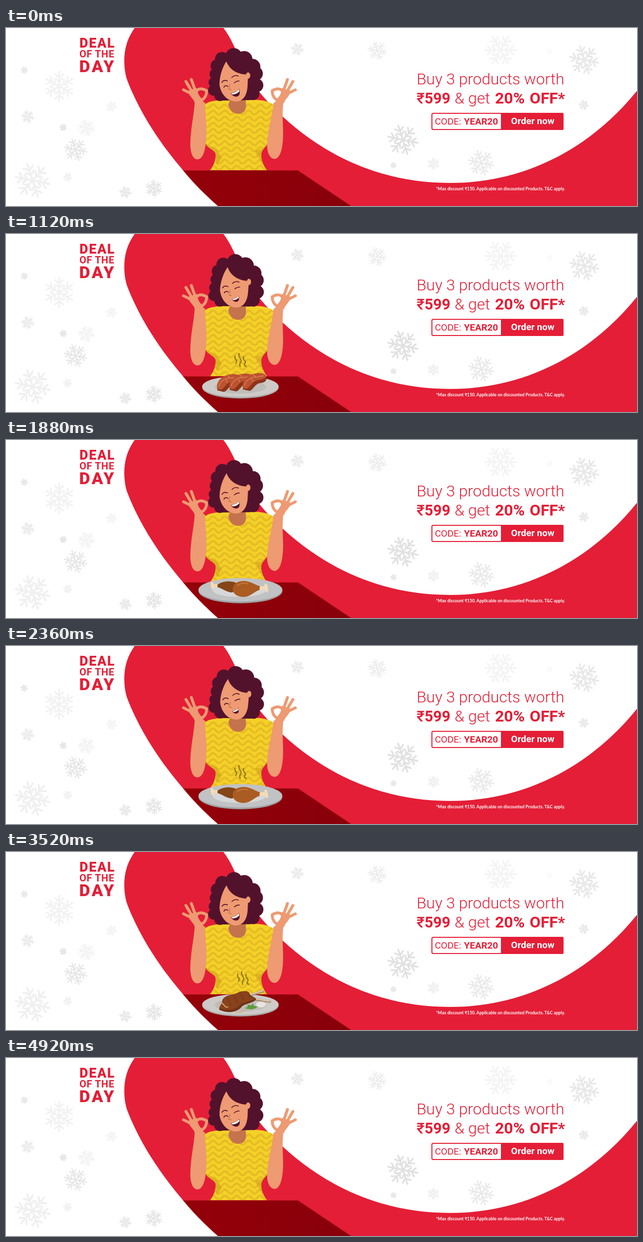
Write an HTML page that moves like this. It is 1280 px wide and 363 px high and loops after 5000 ms.

```html
<!DOCTYPE html>
<html lang="en">
<head>
<meta charset="utf-8">
<title>Deal of the day</title>
<style>
html, body { margin: 0; width: 100%; height: 100%; overflow: hidden; background: #fff; }
svg { display: block; width: 100%; height: 100%; }
text { font-family: Roboto, "Open Sans", sans-serif; fill: #e41e36; white-space: pre; }
.light { font-weight: 350; }
.bold { font-weight: 700; }
.black { font-weight: 900; }
.skin { fill: #ee9a72; }
.finger { fill: none; stroke: #ee9a72; stroke-width: 5.8; stroke-linecap: round; stroke-linejoin: round; }
.hair { fill: #53122c; }
.line { fill: none; stroke: #53122c; stroke-width: 1.7; stroke-linecap: round; }
</style>
</head>
<body>
<svg viewBox="0 0 1280 363" xmlns="http://www.w3.org/2000/svg">
  <defs>
    <path id="swoosh" d="M261 0C245 22 240 45 240 67C240 85 243 100 248 112C273 175 313 236 359 290C381 317 405 341 430 363H1280V128C1190 240 1060 316 900 316C760 316 640 260 545 165C520 140 493 108 475 64C463 38 455 18 441 0Z"/>
    <path id="shirt" d="M402 157C410 149 426 147 450 147H492C514 145 534 149 543 157L546 170L534 205L532 234C527 243 519 248 518 256C517 270 522 280 530 291H413C421 282 426 270 425 256C422 248 410 246 405 236C408 205 404 178 402 157Z"/>
    <clipPath id="inSwoosh"><use href="#swoosh"/></clipPath>
    <clipPath id="inShirt"><use href="#shirt"/></clipPath>
    <linearGradient id="wood" x1="0" x2="1">
      <stop offset="0" stop-color="#940009"/><stop offset="1" stop-color="#88000a"/>
    </linearGradient>
    <g id="hand">
      <path class="skin" d="M383 153C381 144 370 139 370 128L387 122C388 131 391 139 399 146L403 157Z"/>
      <path class="finger" d="M376 134L360 126M378 131L365 109M384 128L376 105"/>
      <path class="finger" d="M386 130C390 121 401 124 407 128C407 137 403 145 394 148"/>
    </g>
    <g id="steak">
      <path fill="#8c3418" d="M429 319C426 300 440 288 456 287C470 285 479 291 476 299C472 308 464 304 458 308C451 312 449 320 442 322Z"/>
      <path fill="#bd5330" d="M428 312C428 298 440 288 456 286C468 284 478 289 475 294C470 300 461 298 454 302C446 306 443 314 437 317C432 318 428 316 428 312Z"/>
      <path fill="none" stroke="#dc8a62" stroke-width="1.3" stroke-linecap="round" d="M432 311C434 300 446 293 455 294L471 291M455 294L450 289M446 297L449 303"/>
    </g>
    <g id="dish">
      <ellipse cx="475.500" cy="316" rx="70" ry="21" fill="#5d0007" opacity=".45"/>
      <ellipse cx="475.500" cy="313" rx="77.500" ry="22.500" fill="#aaa7a4"/>
      <ellipse cx="475.500" cy="311" rx="77.500" ry="21.500" fill="#cdcac7"/>
      <ellipse cx="475.500" cy="312" rx="52" ry="13.500" fill="#bfbcb9"/>
    </g>
  </defs>

  <g id="flakes" fill="none" stroke-linecap="round"></g>
  <use href="#swoosh" fill="#e41e36"/>

  <g>
    <use href="#shirt" fill="#f4d127"/>
    <g clip-path="url(#inShirt)">
      <path id="waves" fill="none" stroke="#e6bd25" stroke-width="4.500"/>
      <path fill="#c99f18" opacity=".55" d="M405 236L427 248L438 264L428 280L424 262ZM532 236L518 248L504 250L514 266L520 280Z"/>
    </g>
    <path fill="#c4734d" d="M456 145H486L487 160C486 170 480 175 471 175C460 175 452 167 451 155Z"/>
  </g>

  <g id="head">
    <g id="curls" class="hair">
      <path d="M422 92L436 62L465 50L490 60L508 85L512 125L496 147L438 148L415 128Z"/>
    </g>
    <path class="skin" d="M447 68C439 80 433 98 433 116C436 136 450 150 467 150C481 149 489 138 490 118L491 95C472 95 454 87 447 68Z"/>
    <ellipse class="skin" cx="491" cy="97" rx="4.500" ry="6.500"/>
    <path class="line" stroke-width="2.200" d="M438 111C440 107 444 106 449 108M458 101C461 97 467 96 471 98"/>
    <path class="line" d="M442 121C443 117 447 117 450 119M463 112C465 110 468 108 473 108"/>
    <path fill="none" stroke="#c4734d" stroke-width="1.500" stroke-linecap="round" d="M454 115L452 125L457 126"/>
    <g id="mouth">
      <path class="hair" d="M456 133Q467 132 473 124Q477 139 467 140Q460 140 456 133Z"/>
      <path fill="#fff" d="M457 133Q467 132 472.500 125L473.500 129Q467 136 459 135.500Z"/>
    </g>
  </g>

  <path class="skin" d="M383 148L404 152C403 175 409 200 406 225C405 250 399 268 388 268C377 267 373 250 374 232C375 200 382 175 383 148Z"/>
  <path class="skin" d="M543 152L563 148C559 180 563 200 562 222C561 250 555 266 545 267C533 266 528 250 530 230C532 205 540 180 543 152Z"/>
  <use href="#hand"/>
  <use href="#hand" transform="matrix(-1 0 0 1 947 0)"/>

  <g clip-path="url(#inSwoosh)">
    <path fill="url(#wood)" d="M350 290H592L700 363H425Z"/>
    <path fill="none" stroke="#b8101f" d="M355 290.500H592L700 363"/>

    <g class="plate">
      <use href="#dish"/>
      <use href="#steak"/>
      <use href="#steak" x="25" y="-1"/>
      <use href="#steak" x="52" y="-2"/>
    </g>

    <g class="plate">
      <ellipse cx="475" cy="312" rx="76" ry="22" fill="#5d0007" opacity=".45"/>
      <ellipse cx="475.500" cy="308" rx="85" ry="25" fill="#9fa1a3"/>
      <ellipse cx="475.500" cy="305.500" rx="85" ry="24" fill="#c0c2c4"/>
      <ellipse cx="473" cy="306" rx="54" ry="14" fill="#d6d7d8"/>
      <path fill="none" stroke="#f3dcb6" stroke-width="6" stroke-linecap="round" d="M420 297H438M418 293L419 301M506 302L526 301M527 296L529 307"/>
      <path fill="#854517" d="M429 295C438 288 454 286 466 291C474 297 470 308 458 311C446 310 438 302 429 300Z"/>
      <path fill="#ab5c22" d="M460 302C462 291 474 286 488 288C499 290 507 296 515 298L514 306C502 309 498 320 480 320C467 319 459 312 460 302Z"/>
      <path fill="none" stroke="#c77a39" stroke-width="2" stroke-linecap="round" d="M469 297C475 292 483 291 490 293"/>
    </g>

    <g class="plate">
      <use href="#dish"/>
      <ellipse cx="517" cy="311" rx="10" ry="6" fill="#e6e4df"/>
      <g fill="none" stroke-linecap="round">
        <path id="bones" stroke="#a08068" stroke-width="5" d="M488 294L521 284M494 300C510 299 522 304 535 305"/>
        <path stroke="#d9c4a8" stroke-width="3" d="M488 293L521 283M494 299C510 298 522 303 535 304"/>
      </g>
      <path fill="#6e3115" d="M433 322C430 316 440 309 439 302C445 290 461 292 470 287C480 282 494 283 494 289C496 296 508 295 507 301C500 309 482 309 477 317C469 325 454 331 433 322Z"/>
      <path fill="#8a421c" d="M433 318C434 311 442 307 441 300C447 291 462 293 471 287C480 283 494 284 493 290C490 299 505 295 505 299C496 306 481 305 474 313C464 322 449 325 433 318Z"/>
      <path fill="none" stroke="#6e3115" stroke-width="1.500" d="M449 297L457 313M462 293L470 308M476 288L482 302"/>
      <path fill="#5c9c3b" d="M484 319L491 315L489 311L497 313L501 309L503 314L511 315L506 319L498 321Z"/>
      <path fill="none" stroke="#d4b080" stroke-width="1.800" stroke-linecap="round" d="M432 309Q438 306 442 312T450 316M466 326Q474 329 481 325T488 322"/>
    </g>

    <path id="steam" fill="none" stroke="#6c5b14" stroke-width="2.500" stroke-linecap="round" d="M465 249C461 255 472 257 466 264M473 244C469 252 482 256 475 263C473 266 474 268 475 270M482 250C478 256 490 259 484 265C483 267 485 269 487 270"/>
  </g>

  <text class="black" x="149" y="40" font-size="27" letter-spacing="1.800">DEAL</text>
  <text class="bold" x="149" y="60" font-size="20" letter-spacing=".7">OF THE</text>
  <text class="black" x="148.500" y="90" font-size="34" letter-spacing="3.500">DAY</text>

  <text class="light" x="833" y="114.500" font-size="32">Buy 3 products worth</text>
  <g font-size="32">
    <text class="bold" x="833" y="154" font-size="30.500"><tspan font-weight="500">₹</tspan>599</text>
    <text class="light" x="910" y="154">&amp; get</text>
    <text class="bold" x="992" y="154">20%</text>
    <text class="bold" x="1134" y="154" text-anchor="end">OFF*</text>
  </g>

  <rect x="864" y="174" width="266" height="33" rx="2.500" fill="#fff" stroke="#e41e36" stroke-width="2"/>
  <path fill="#e41e36" d="M1004 173H1128Q1131 173 1131 176V205Q1131 208 1128 208H1004Z"/>
  <g font-size="19">
    <text x="870" y="196.500">CODE:</text>
    <text class="bold" x="929" y="196.500">YEAR20</text>
    <text class="bold" x="1068.500" y="196" text-anchor="middle" style="fill:#fff">Order now</text>
  </g>
  <text class="bold" x="1134" y="331" font-size="8.700" text-anchor="end" style="fill:#fff;font-family:Lato,'Open Sans',sans-serif">*Max discount ₹150. Applicable on discounted Products. T&amp;C apply.</text>
</svg>

<script>
const LOOP = 5000, STEP = 40, TURN = LOOP / 3;
const TRAVEL = 205, ENTER = 190, EXIT_AT = 1380, EXIT = 210, STEAM_LAG = 12;
const $ = id => document.getElementById(id);
const clamp = v => Math.min(1, Math.max(0, v));
const plates = [...document.querySelectorAll(".plate")];

function add(parent, name, attrs) {
  const el = document.createElementNS("http://www.w3.org/2000/svg", name);
  for (const key in attrs) el.setAttribute(key, attrs[key]);
  parent.append(el);
}

// One arm of a unit snowflake, turned six times.
function flake(x, y, r, grey, turn = 12) {
  let d = "";
  const line = (a, r0, b, r1) =>
    d += `M${Math.cos(a) * r0} ${Math.sin(a) * r0}L${Math.cos(b) * r1} ${Math.sin(b) * r1}`;
  for (let i = 0; i < 6; i++) {
    const a = i * Math.PI / 3;
    line(a, 0, a, 0.95);
    for (const side of [-1, 1]) {
      line(a, 0.3, a + side * 0.42, 0.54);
      line(a, 0.56, a + side * 0.33, 0.83);
    }
  }
  add($("flakes"), "path", {
    d, stroke: `rgb(${grey},${grey},${grey})`, "stroke-width": 0.11,
    transform: `translate(${x} ${y}) rotate(${turn}) scale(${r})`
  });
}

[
  [108, 119, 32, 242, 30], [37, 86, 8, 222], [44, 181, 14, 230], [116, 203, 8, 218],
  [163, 204, 18, 241], [141, 248, 24, 230], [214, 160, 12, 241], [54, 311, 37, 240],
  [125, 304, 10, 236], [242, 335, 13, 226], [300, 327, 18, 226, 24], [591, 43, 14, 230],
  [753, 46, 20, 236], [805, 228, 32, 225], [786, 280, 7, 222], [867, 277, 13, 236, 30],
  [964, 275, 27, 234], [1003, 45, 33, 244, 0], [1103, 48, 7, 247], [1173, 65, 31, 232],
  [1172, 157, 11, 226]
].forEach(f => flake(...f));

[
  [462, 58, 17], [483, 64, 17], [438, 63, 14], [500, 79, 16], [506, 93, 15],
  [508, 117, 14], [501, 134, 13], [428, 77, 13], [425, 94, 12], [422, 111, 11],
  [421, 127, 11], [434, 137, 12]
].forEach(([cx, cy, r]) => add($("curls"), "circle", { cx, cy, r }));

let waves = "";
for (let y = 160; y < 295; y += 12.5) waves += `M390 ${y}q6 -8 12 0${"t12 0".repeat(13)}`;
$("waves").setAttribute("d", waves);

const cubicOut = u => 1 - (1 - u) ** 3;
const softBack = u => 1 + 1.9 * (u - 1) ** 3 + 0.9 * (u - 1) ** 2;
const leave = p => -TRAVEL * clamp((p - EXIT_AT) / EXIT) ** 3;
const shift = (el, x) => el.setAttribute("transform", `translate(${x} 0)`);

function draw(t) {
  const turn = Math.floor(t / TURN), p = t - turn * TURN;
  const tilt = (1 - Math.cos(2 * Math.PI * p / TURN)) / 2;
  $("head").setAttribute("transform", `rotate(${2.5 * tilt} 466 150)`);
  $("mouth").setAttribute("transform",
    `translate(464 132) scale(${1 - 0.28 * tilt}) translate(-464 -132)`);

  const enter = TRAVEL * (cubicOut(clamp(p / ENTER)) - 1);
  plates.forEach((plate, i) => {
    plate.style.display = i === turn ? "" : "none";
    shift(plate, enter + leave(p));
  });

  // The last dish brings its steam along; the others let it rise once settled.
  const slides = turn === 2;
  const drift = slides ? TRAVEL * (softBack(clamp(p / 300)) - 1) : 0;
  shift($("steam"), drift + leave(p - STEAM_LAG));
  $("steam").setAttribute("opacity", 0.7 * (slides ? 1 : clamp((p - 200) / 200)));
}

const start = performance.now();
function tick() {
  const t = (performance.now() - start) % LOOP;
  draw(Math.min(LOOP - 2 * STEP, Math.floor(t / STEP) * STEP));
  requestAnimationFrame(tick);
}
tick();
</script>
</body>
</html>
```
